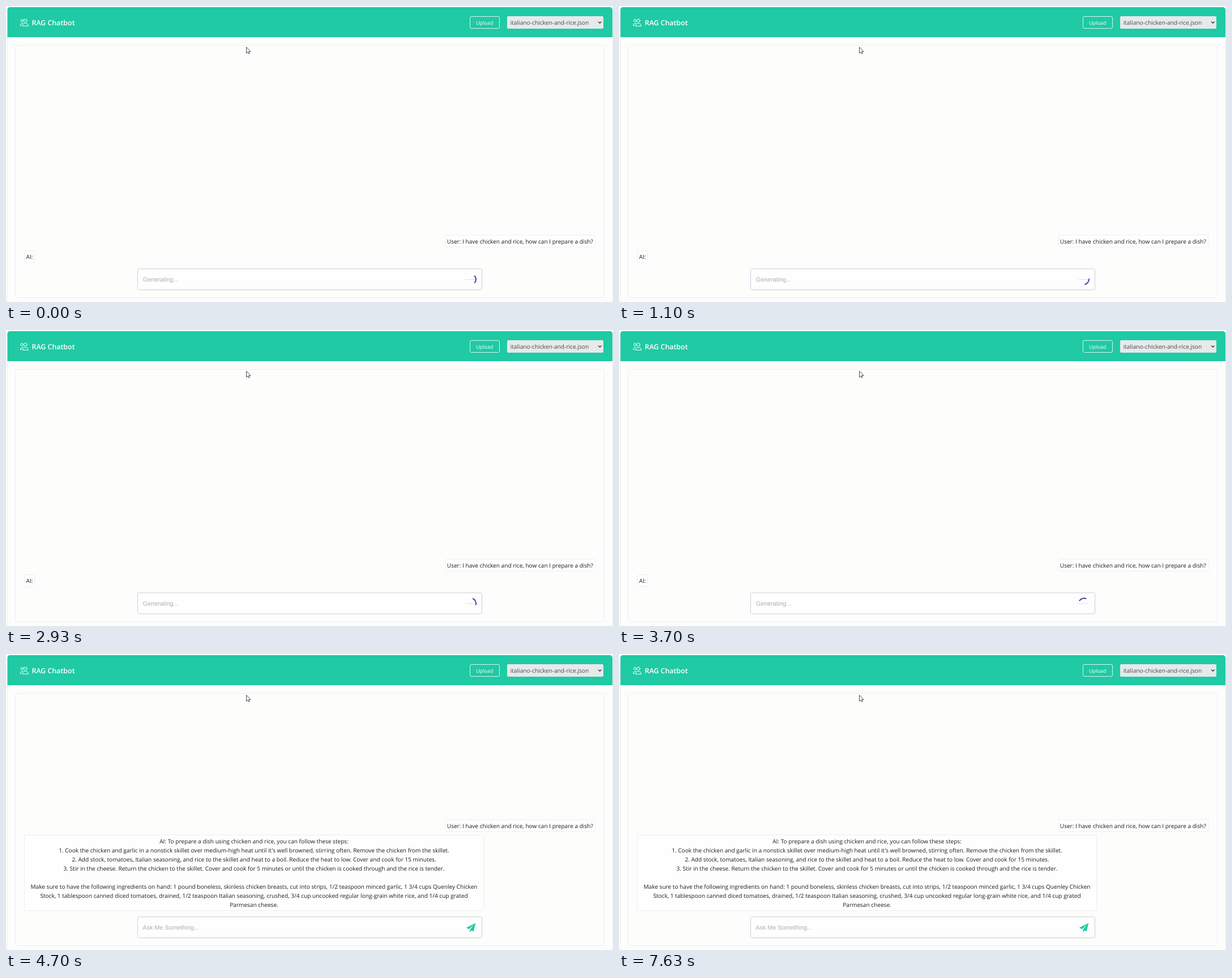
Write an HTML page that moves like this. It is 1072 by 522 pixels and loops after 7710 ms.

```html
<!DOCTYPE html>
<html lang="en">
<head>
<meta charset="utf-8">
<title>RAG Chatbot</title>
<style>
  html, body { margin: 0; width: 100%; height: 100%; overflow: hidden; background: #fdfdfc; }
  #stage { position: relative; width: 1072px; height: 522px; overflow: hidden; }
  svg { position: absolute; left: 0; top: 0; display: block; }
  text {
    font: 10.1px "Open Sans", "Noto Sans", sans-serif;
    fill: #1c1d22;
    text-rendering: geometricPrecision;
  }
  .title { font-size: 12.4px; font-weight: 600; fill: #fff; }
  .button { font-size: 9px; fill: #fff; }
  .file { font-size: 10.2px; fill: #44494f; }
  .hint { font: 10.8px "Liberation Sans", Arial, sans-serif; fill: #adadab; }
  .answer { text-anchor: middle; }
  .bubble { fill: #fefefe; stroke: #eceef2; }
  .icon { fill: none; stroke: #fff; stroke-linecap: round; stroke-linejoin: round; }
  #spinner {
    position: absolute; left: 811px; top: 472px; width: 20px; height: 20px;
    box-sizing: border-box; border: 2px solid transparent;
    border-right-color: #463aac; border-radius: 50%;
  }
</style>
</head>
<body>
<div id="stage">
  <svg width="1072" height="522" viewBox="0 0 1072 522">
    <path d="M2.5 522V8Q2.5 2.5 8 2.5H1065Q1071.5 2.5 1071.5 8V522" fill="none" stroke="#eeeff0"/>
    <path d="M2.5 55V7Q2.5 2 7.500 2H1066Q1071 2 1071 7V55Z" fill="#1fcaa4"/>

    <g class="icon">
      <circle cx="34.300" cy="25.700" r="2.800"/>
      <path d="M29.300 35Q29.300 30.600 34.300 30.600T39.300 35Z"/>
      <circle cx="28.200" cy="25.800" r="2.200"/>
      <path d="M25.300 34.300Q25.300 30.400 29.700 30.500M25.300 34.300H27.500"/>
    </g>
    <text class="title" x="45.500" y="33.700">RAG Chatbot</text>

    <rect x="819.500" y="18.500" width="52" height="21" rx="2.500" fill="none" stroke="#d8f4ed"/>
    <text class="button" x="830" y="32.700">Upload</text>
    <rect x="885" y="18" width="170" height="22" rx="2" fill="#e7e9ea"/>
    <text class="file" x="890.700" y="33">italiano-chicken-and-rice.json</text>
    <path d="M1046 27.500L1048.800 30.300L1051.600 27.500" fill="none" stroke="#33383d" stroke-width="1.300"/>

    <rect x="16.500" y="69.500" width="1040" height="445" rx="3" fill="none" stroke="#eceef1"/>

    <g id="question">
      <rect class="bubble" x="776.500" y="404" width="264" height="21" rx="2"/>
      <text x="778.800" y="418.600">User: I have chicken and rice, how can I prepare a dish?</text>
    </g>

    <rect x="232.500" y="463.500" width="608" height="37" rx="2" fill="#fefefe" stroke="#ced0da"/>

    <g id="waiting">
      <rect class="bubble" x="32.500" y="431.500" width="18" height="21" rx="2"/>
      <text x="35.500" y="446.300">AI:</text>
      <text class="hint" x="241.800" y="486">Generating...</text>
      <path d="M811 482.500H830" stroke="#dfdfeb"/>
    </g>

    <g id="done">
      <rect class="bubble" x="32.500" y="319" width="811" height="133.500" rx="2"/>
      <g id="lines"></g>
      <text class="hint" x="241.300" y="486">Ask Me Something...</text>
      <path d="M829.300 474.500L812.800 482.800L817.600 485.200L826.300 477.500L819.300 486.200V490.700L821.900 487.300L825.700 489.200Z" fill="#1fc9a4"/>
    </g>

    <path d="M424.600 72.600V83.300L427 81.100L428.700 84.300L430.200 83.500L428.600 80.400H432Z" fill="#fff" stroke="#33363a" stroke-width=".9" stroke-linejoin="round"/>
  </svg>
  <div id="spinner"></div>
</div>
<script>
  const LOOP = 7710, REPLY_AT = 4660, SPIN = 1000, RISE = 112;
  const answer = [
    "AI: To prepare a dish using chicken and rice, you can follow these steps:",
    "1. Cook the chicken and garlic in a nonstick skillet over medium-high heat until it's well browned, stirring often. Remove the chicken from the skillet.",
    "2. Add stock, tomatoes, Italian seasoning, and rice to the skillet and heat to a boil. Reduce the heat to low. Cover and cook for 15 minutes.",
    "3. Stir in the cheese. Return the chicken to the skillet. Cover and cook for 5 minutes or until the chicken is cooked through and the rice is tender.",
    "",
    "Make sure to have the following ingredients on hand: 1 pound boneless, skinless chicken breasts, cut into strips, 1/2 teaspoon minced garlic, 1 3/4 cups Quenley Chicken",
    "Stock, 1 tablespoon canned diced tomatoes, drained, 1/2 teaspoon Italian seasoning, crushed, 3/4 cup uncooked regular long-grain white rice, and 1/4 cup grated",
    "Parmesan cheese."
  ];
  const $ = id => document.getElementById(id);
  const show = (id, on) => { $(id).style.visibility = on ? "visible" : "hidden"; };

  answer.forEach((line, i) => {
    const el = document.createElementNS("http://www.w3.org/2000/svg", "text");
    el.setAttribute("class", "answer");
    el.setAttribute("x", 438);
    el.setAttribute("y", 334 + 16 * i);
    el.textContent = line;
    $("lines").append(el);
  });

  function render(t) {
    const replied = t >= REPLY_AT;
    show("waiting", !replied);
    show("spinner", !replied);
    show("done", replied);
    $("question").setAttribute("transform", `translate(0 ${replied ? -RISE : 0})`);
    $("spinner").style.transform = `rotate(${t % SPIN / SPIN * 360}deg)`;
  }

  const start = performance.now();
  function tick() {
    render((performance.now() - start) % LOOP);
    requestAnimationFrame(tick);
  }
  tick();
</script>
</body>
</html>
```
